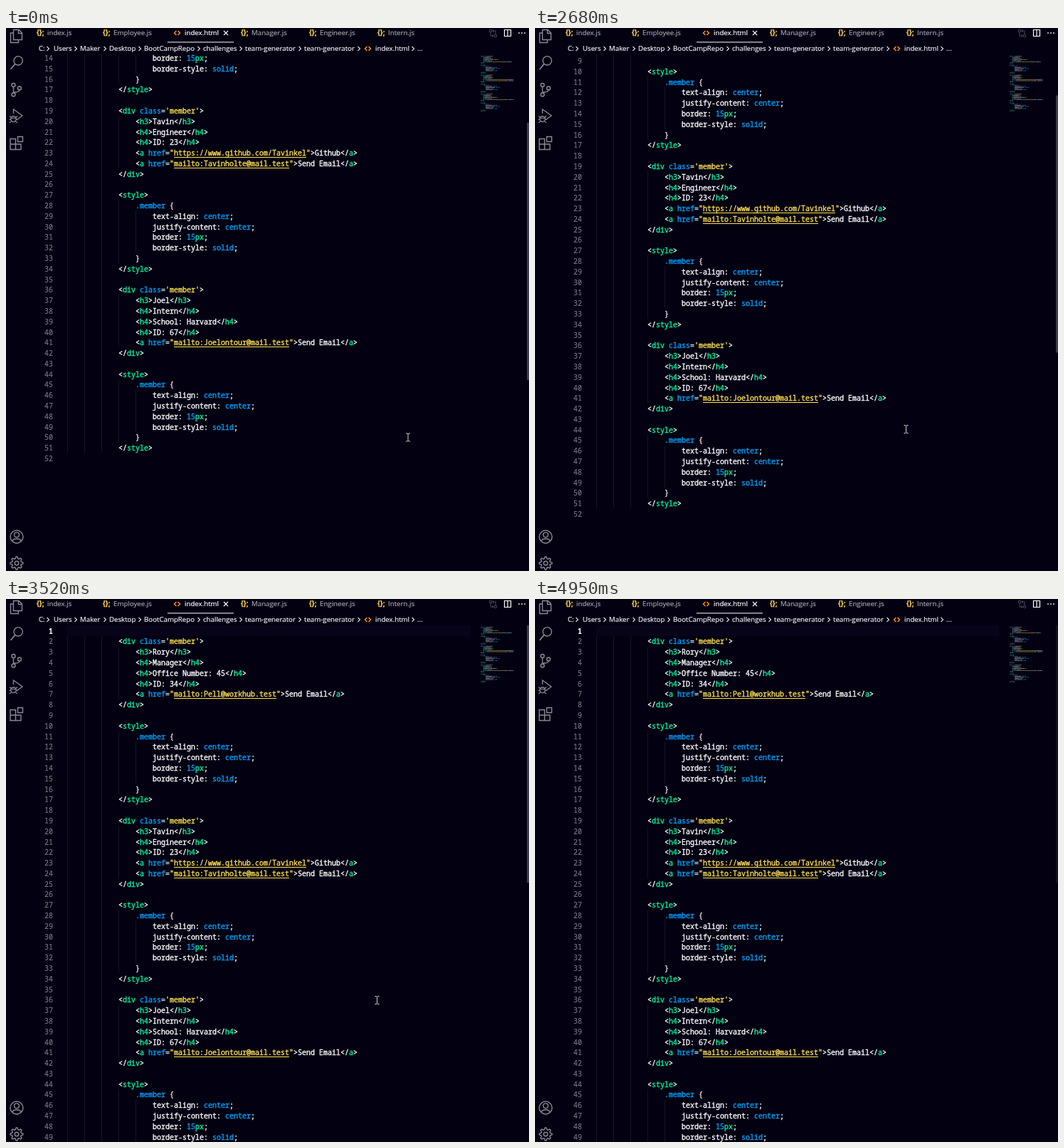
Write an HTML page with a canvas that moves like this. It is 735 by 762 pixels and loops after 5.25 s.

```html
<!DOCTYPE html>
<html lang="en">
<head>
<meta charset="utf-8">
<title>Code editor</title>
<style>
  html, body { margin: 0; width: 100%; height: 100%; overflow: hidden; background: #030012; }
  #stage { position: absolute; left: 0; top: 0; width: 735px; height: 762px; overflow: hidden; background: #030012; }
  #editor { position: absolute; left: 0; top: 37px; width: 735px; height: 725px; overflow: hidden;
    font: 10px/15px "Noto Sans Mono", "DejaVu Sans Mono", monospace; }
  #code { position: absolute; left: 0; top: 0; }
  .row, .num { position: absolute; white-space: pre; height: 15px; }
  .row { left: 86px; -webkit-text-stroke: 0.35px; }
  .num { left: 46px; width: 20px; text-align: right; color: #7d7b88; -webkit-text-stroke: 0.1px; }
  .link { text-decoration: underline 1px; text-underline-offset: 2px; text-decoration-skip-ink: none; }
  .label { position: absolute; white-space: pre; font: 9.7px/14px "Open Sans", "Noto Sans", sans-serif;
    -webkit-text-stroke: 0.2px; }
  canvas { position: absolute; left: 0; top: 0; }
</style>
</head>
<body>
<div id="stage">
  <div id="editor"><div id="code"></div></div>
  <canvas id="art" width="735" height="762"></canvas>
</div>
<script>
const LOOP = 5250, PITCH = 14.79, TOP = 37;
const WHITE = '#ffffff', GREEN = '#00f7a0', BLUE = '#00a2ff', YELLOW = '#ffe250', PINK = '#fbe0f6';
const GREY = '#8b8994', ORANGE = '#ff8c1e';

const stage = document.getElementById('stage');
const code = document.getElementById('code');
const ctx = document.getElementById('art').getContext('2d');

// ---- document text, as [indent, [text, colour, isLink]...] ----
const open = (tag, attrs = []) => [['<', WHITE], [tag, GREEN], ...attrs, ['>', WHITE]];
const close = tag => [['</', WHITE], [tag, GREEN], ['>', WHITE]];
const attr = (name, quote, value, link) =>
  [[' ' + name, BLUE], ['=', WHITE], [quote, YELLOW], [value, YELLOW, link], [quote, YELLOW]];
const heading = (tag, text) => [16, ...open(tag), [text, WHITE], ...close(tag)];
const anchor = (url, text) => [16, ...open('a', attr('href', '"', url, true)), [text, WHITE], ...close('a')];
const rule = (name, ...value) => [20, [name + ': ', WHITE], ...value, [';', WHITE]];

const styles = () => [
  [12, ...open('style')],
  [16, ['.member', BLUE], [' {', PINK]],
  rule('text-align', ['center', BLUE]),
  rule('justify-content', ['center', BLUE]),
  rule('border', ['15', BLUE], ['px', GREEN]),
  rule('border-style', ['solid', BLUE]),
  [16, ['}', PINK]],
  [12, ...close('style')]
];
const member = (name, facts, links) => [
  [12, ...open('div', attr('class', "'", 'member'))],
  heading('h3', name),
  ...facts.map(f => heading('h4', f)),
  ...links.map(l => anchor(...l)),
  [12, ...close('div')], [0],
  ...styles(), [0]
];
const lines = [
  [0],
  ...member('Rory', ['Manager', 'Office Number: 45', 'ID: 34'],
    [['mailto:Pell@workhub.test', 'Send Email']]),
  ...member('Tavin', ['Engineer', 'ID: 23'],
    [['https://www.github.com/Tavinkel', 'Github'], ['mailto:Tavinholte@mail.test', 'Send Email']]),
  ...member('Joel', ['Intern', 'School: Harvard', 'ID: 67'],
    [['mailto:Joelontour@mail.test', 'Send Email']])
];

function add(parent, cls, text, css) {
  const el = document.createElement('span');
  el.className = cls;
  el.textContent = text;
  Object.assign(el.style, css);
  parent.appendChild(el);
  return el;
}

const numbers = lines.map(([indent, ...parts], i) => {
  const top = i * PITCH + 0.7 + 'px';
  const row = add(code, 'row', ' '.repeat(indent), { top });
  parts.forEach(([text, color, link]) => add(row, link ? 'link' : '', text, { color }));
  return add(code, 'num', i + 1, { top });
});

// ---- tabs and breadcrumb ----
const label = (text, x, y, color, css) =>
  add(stage, 'label', text, { left: x + 'px', top: y - 7 + 'px', color, ...css });

[['index.js', 58], ['Employee.js', 151], ['Manager.js', 345], ['Engineer.js', 441], ['Intern.js', 537]]
  .forEach(([name, x]) => {
    label('{};', x - 15, 7, '#fbd04a', { fontWeight: 700 });
    label(name, x, 7, '#a5a3ae');
  });
label('index.html', 251, 7, '#ffffff');

[['C:', 46], ['Users', 67], ['Maker', 104], ['Desktop', 145], ['BootCampRepo', 194], ['challenges', 277],
 ['team-generator', 336], ['team-generator', 419], ['index.html', 519], ['...', 578]]
  .forEach(([name, x]) => label(name, x, 29, '#f4f2fa'));

// ---- drawing helpers ----
function stroke(d, color = GREY, width = 1.4) {
  ctx.strokeStyle = color;
  ctx.lineWidth = width;
  ctx.stroke(new Path2D(d));
}
function ring(x, y, r, color = GREY, width = 1.4) {
  ctx.strokeStyle = color;
  ctx.lineWidth = width;
  ctx.beginPath();
  ctx.arc(x, y, r, 0, 7);
  ctx.stroke();
}
function box(x, y, w, h, color) {
  ctx.fillStyle = color;
  ctx.fillRect(x, y, w, h);
}
const angles = (x, y) =>
  stroke(`M${x + 3.5} ${y - 3}l-3 3l3 3M${x + 5.5} ${y - 3}l3 3l-3 3`, ORANGE, 1.5);

function gear(x, y) {
  ctx.beginPath();
  for (let i = 0; i < 32; i++) {
    const r = i % 4 < 2 ? 9 : 6.6, a = (i - 0.5) * Math.PI / 16;
    ctx.lineTo(x + r * Math.cos(a), y + r * Math.sin(a));
  }
  ctx.closePath();
  ctx.stroke();
  ring(x, y, 2.8);
}

function sideBar() {
  stroke('M10.5 2.5H18l4.5 4.5V16.5H10.5ZM17.5 2.5V7.5H22.5M10.5 7H6.5V20.5H17.5V16.5');
  ring(17.2, 45.8, 6.2);
  stroke('M12.8 50.4L6.5 58', GREY, 1.7);
  ring(10.5, 80, 2.5);
  ring(19, 84.5, 2.5);
  ring(10.5, 93.5, 2.5);
  stroke('M10.5 82.5V91M19 87Q18.5 90 14 90Q11 90 10.5 91');
  stroke('M10.5 120V114L23 123L15.5 128.5');
  ring(10.5, 127.8, 3.8);
  stroke('M7 126.5H14M5 123.5l2.5 2M16 123.5l-2.5 2M4.5 128.5H7M14 128.5h2.5M5 133l2.5-2M16 133l-2.5-2', GREY, 1.1);
  stroke('M6 155.5H13.5V170.5H6ZM6 163H21V170.5H13.5M16.5 152.5H23.5V159.5H16.5Z');
  ring(15, 714, 9);
  ring(15, 711.3, 3.4);
  stroke('M8.8 720.2C10 715.5 20 715.5 21.2 720.2');
  gear(15, 751);
}

function topBar() {
  angles(236, 7);
  angles(504, 29);
  stroke('M306 4l6 6M312 4l-6 6', '#ffffff', 1.1);
  box(227, 19.4, 93, 1, '#ffffff');
  [59, 98, 139, 188, 271, 330, 413, 496, 572].forEach(x =>
    stroke(`M${x - 1.5} 26l3 3l-3 3`, '#e6e4ee', 1.1));
  const dim = '#45434f';
  ring(681, 4, 1.7, dim, 1.1);
  ring(688, 11, 1.7, dim, 1.1);
  stroke('M681 6V11H685M683.5 9.5L685 11L683.5 12.5M688 9V4H684M685.5 2.5L684 4L685.5 5.5', dim, 1.1);
  stroke('M700.5 2.5H709.5V11.5H700.5ZM705 2.5V11.5', '#ffffff', 1.2);
  [721, 725, 729].forEach(x => box(x - 0.8, 6.2, 1.6, 1.6, '#ffffff'));
}

function miniMap() {
  ctx.globalAlpha = 0.55;
  lines.forEach(([indent, ...parts], i) => {
    let col = indent;
    for (const [text, color] of parts)
      for (const ch of text) {
        if (ch !== ' ') box(657.6 + col * 0.82, 37.6 + i * 1.56, 0.7, 1, color);
        col++;
      }
  });
  ctx.globalAlpha = 1;
}

function guides(scroll) {
  ctx.save();
  ctx.beginPath();
  ctx.rect(54, TOP, 681, 725);
  ctx.clip();
  if (!scroll) box(86, TOP, 566, 15, '#070419');
  lines.forEach(([indent], i) => {
    if (i === 0 || i === lines.length - 1) return;
    const y = Math.round(TOP + i * PITCH - scroll);
    const end = Math.round(TOP + (i + 1) * PITCH - scroll);
    for (let c = 0; c < Math.max(indent, 12); c += 4) box(86 + c * 6, y, 1, end - y, '#161426');
  });
  ctx.restore();
}

// ---- motion ----
const scrollAt = t => 195 - 39 * [2500, 2680, 2830, 2980, 3520].filter(s => t >= s).length;

const stops = [[0, 565, 574.5], [260, 563, 573], [300, 561, 572.3], [530, 561, 571.5],
  [770, 542, 567], [830, 521.5, 564.5], [1200, 521.5, 563]];
const EXIT = 3970, TICK = 62.5;

function pointerAt(t) {
  if (t < EXIT) return stops.filter(s => t >= s[0]).pop().slice(1);
  const k = Math.floor((t - EXIT) / TICK);
  const u = Math.min(1, (k + 1) / 4), ease = u * u * (3 - 2 * u), extra = Math.max(0, k - 3);
  return [521.5 + 152.5 * ease + 8 * extra, 563 + 140 * ease + 22 * extra];
}

function pointer(t) {
  const [x, y] = pointerAt(t);
  if (y > 762) return;
  if (x < 660) {
    stroke(`M${x - 3} ${y - 5.5}h2.2l.8 .8l.8 -.8h2.2M${x} ${y - 5}v10M${x - 3} ${y + 5.5}h2.2l.8 -.8l.8 .8h2.2`, '#d4d2da', 1);
    return;
  }
  ctx.fillStyle = '#ffffff';
  ctx.fill(new Path2D(`M${x} ${y}v12.2l2.8 -2.6l2 4.4l2 -.9l-2 -4.2h3.8Z`));
}

function draw(t) {
  const scroll = scrollAt(t);
  code.style.top = -scroll + 'px';
  numbers[0].style.color = scroll ? '' : '#ffffff';
  numbers[0].style.fontWeight = scroll ? '' : '600';
  ctx.clearRect(0, 0, 735, 762);
  guides(scroll);
  sideBar();
  topBar();
  miniMap();
  const fade = t < 4710 ? 0.46 : t < 4950 ? 0.26 : 0.12;
  box(732, TOP + scroll * 0.492, 3, 361, `rgba(130,130,142,${fade})`);
  pointer(t);
}

function frame(now) {
  draw(now % LOOP);
  requestAnimationFrame(frame);
}
draw(0);
requestAnimationFrame(frame);
</script>
</body>
</html>
```
